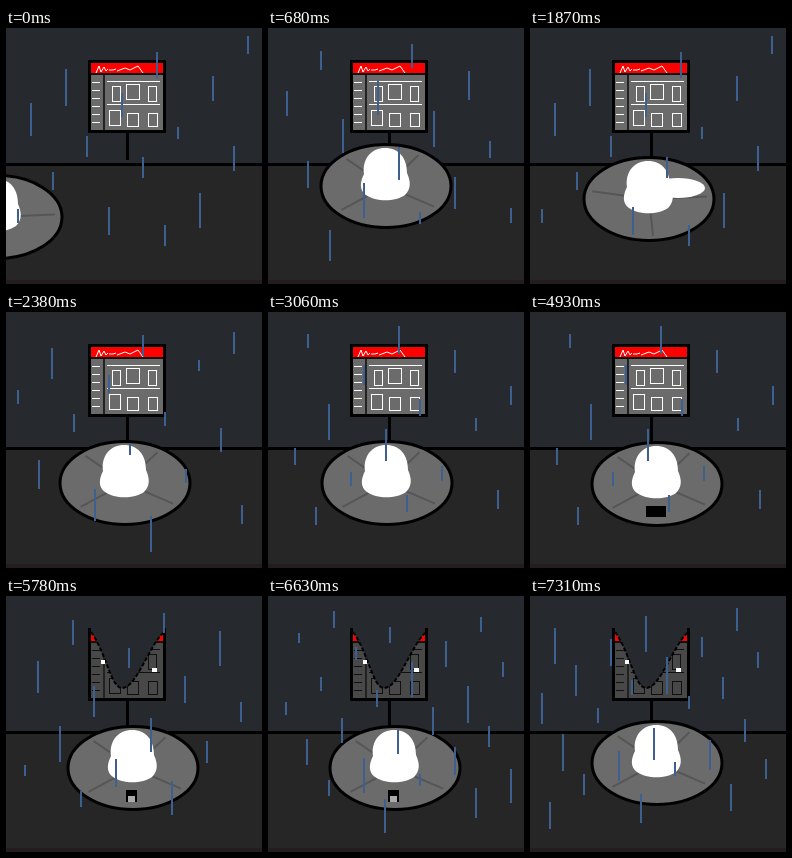
Recreate the animation shown at these times as an HTML page with a canvas. Size 256 by 256 pixels, loop 7480 ms.

```html
<!DOCTYPE html>
<html lang="en">
<head>
<meta charset="utf-8">
<title>Rainy road</title>
<style>
  html, body { margin: 0; width: 100%; height: 100%; overflow: hidden; background: #262626; }
  canvas { display: block; width: 100%; height: 100%; image-rendering: pixelated; }
</style>
</head>
<body>
<canvas id="stage" width="256" height="256"></canvas>
<script>
const ctx = document.getElementById('stage').getContext('2d');
const STEP = 170, STEPS = 44, RAIN_LOOP = 11;
const DEVICE_IN = 27, BREAK = 34, HEAVY_RAIN = 36, DEVICE_OUT = 41;
const SKY = '#262a2f', GROUND = '#262626', GREY = '#6b6b6b';

const clamp = value => Math.max(0, Math.min(1, value));
const progress = (step, from, to) => clamp((step - from) / (to - from));
const pulse = (step, from, peak, to) =>
  Math.min(progress(step, from, peak), 1 - progress(step, peak, to));

function rect(color, x, y, w, h) {
  ctx.fillStyle = color;
  ctx.fillRect(x, y, w, h);
}

function line(color, width, ...points) {
  ctx.strokeStyle = color;
  ctx.lineWidth = width;
  ctx.beginPath();
  points.forEach(([x, y]) => ctx.lineTo(x, y));
  ctx.stroke();
}

function frame(color, width, x, y, w, h) {
  ctx.strokeStyle = color;
  ctx.lineWidth = width;
  ctx.strokeRect(x + .5, y + .5, w, h);
}

function ellipse(x, y, rx, ry) {
  ctx.beginPath();
  ctx.ellipse(x, y, rx, ry, 0, 0, Math.PI * 2);
}

function drawRoad() {
  rect(SKY, 0, 0, 256, 136);
  rect(GROUND, 0, 136, 256, 120);
  rect('#231d20', 0, 252, 256, 4);
  rect('#000', 0, 135, 256, 3);
}

function drawSign(broken) {
  const ink = broken ? '#101010' : '#fff';
  rect('#000', 120, 104, 3, 28);
  rect(broken ? '#484848' : GREY, 84, 34, 75, 70);
  rect('#f00', 84, 35, 75, 10);
  rect('#111', 84, 45, 75, 2);
  rect('#222', 97, 47, 2, 56);
  for (let i = 0; i < 6; i++) rect(ink, 86, 54 + 8 * i, 8, 1);
  for (const y of [53, 76]) rect(ink, 101, y, 53, 1);

  frame(ink, 1, 106, 58, 8, 15);
  frame(ink, 1, 120, 56, 13, 15);
  frame(ink, 1, 142, 58, 8, 15);
  frame(ink, 1, 103, 82, 11, 15);
  frame(ink, 1, 121, 85, 11, 13);
  frame(ink, 1, 142, 85, 9, 13);

  if (!broken) {
    line('#fff', 1, [90, 45], [93, 38], [95, 44], [98, 39], [100, 43], [102, 41]);
    line('#fff', 1, [103, 42], [107, 42], [110, 41]);
    line('#fff', 1, [111, 43], [119, 40], [124, 42], [132, 38], [137, 45]);
  }
  frame('#000', 3, 83, 33, 75, 70);
  if (broken) drawHole();
}

function drawHole() {
  const edge = new Path2D('M85 36C100 56 105 92 116 92C130 92 142 52 157 37');
  const hole = new Path2D(edge);
  hole.lineTo(157, 31);
  hole.lineTo(85, 31);
  ctx.fillStyle = SKY;
  ctx.fill(hole);
  ctx.strokeStyle = '#000';
  ctx.lineWidth = 2;
  ctx.setLineDash([4, 2]);
  ctx.stroke(edge);
  ctx.setLineDash([]);
  rect('#fff', 95, 64, 4, 4);
  rect('#fff', 146, 72, 5, 4);
}

// Rolls in from the left, hops, looks aside, then drifts right
function riderPose(step) {
  const enter = progress(step, 0, 4);
  const land = progress(step, 4, 7);
  const drift = progress(step, 18, 22);
  const hop = progress(step, 40, 43);
  const look = pulse(step, 8, 11, 14);
  return {
    x: Math.round(-9 + 127 * enter + land + 8 * drift),
    y: Math.round(189 - 31 * enter + 13 * land + drift - 5 * hop),
    turn: 52 * (1 - enter + look),
    look
  };
}

function drawRider(step) {
  const { x, y, turn, look } = riderPose(step);
  ctx.save();
  ctx.translate(x, y);

  ellipse(0, 0, 65, 41.5);
  ctx.fillStyle = GREY;
  ctx.fill();
  for (const spoke of [34, 140, 227, 304]) {
    const angle = (spoke + turn) * Math.PI / 180;
    line('#565656', 2, [0, 0], [58 * Math.cos(angle), 37 * Math.sin(angle)]);
  }
  ellipse(0, 0, 65, 41.5);
  ctx.strokeStyle = '#000';
  ctx.lineWidth = 3;
  ctx.stroke();

  ctx.fillStyle = '#fff';
  ctx.fill(new Path2D('M-22-12C-24-28-14-38-1-38C13-38 21-28 21-13C25-4 25 3 19 9C9 16-10 16-20 9C-27 4-26-4-22-12Z'));
  if (look) {
    ellipse(14 + 15 * look, -11, 27 * look, 10);
    ctx.fill();
  }
  ctx.restore();
}

function drawDevice(step) {
  if (step < DEVICE_IN || step >= DEVICE_OUT) return;
  if (step < BREAK) {
    rect('#000', 116, 194, 20, 11);
  } else {
    rect('#000', 120, 194, 11, 12);
    rect('#aaa', 122, 200, 7, 6);
  }
}

// Golden-ratio steps across keep the streaks evenly spread
function drawRain(step) {
  const heavy = step >= HEAVY_RAIN;
  const count = heavy ? 24 : 15;
  let seed = (heavy ? step : step % RAIN_LOOP) * 7919 + 53;
  const random = () => (seed = seed * 16807 % 2147483647) / 2147483647;
  random();
  const offset = random();
  for (let i = 0; i < count; i++) {
    const x = 10 + Math.floor((offset + i * .618) % 1 * 238);
    const top = 8 + Math.floor((i + random()) / count * 200);
    rect('#3d6090', x, top, 2, 10 + Math.floor(random() * 28));
  }
}

function draw(time) {
  const step = Math.floor(time / STEP) % STEPS;
  drawRoad();
  drawSign(step >= BREAK);
  drawRider(step);
  drawDevice(step);
  drawRain(step);
}

const start = performance.now();
function tick() {
  draw(performance.now() - start);
  requestAnimationFrame(tick);
}
tick();
</script>
</body>
</html>
```
